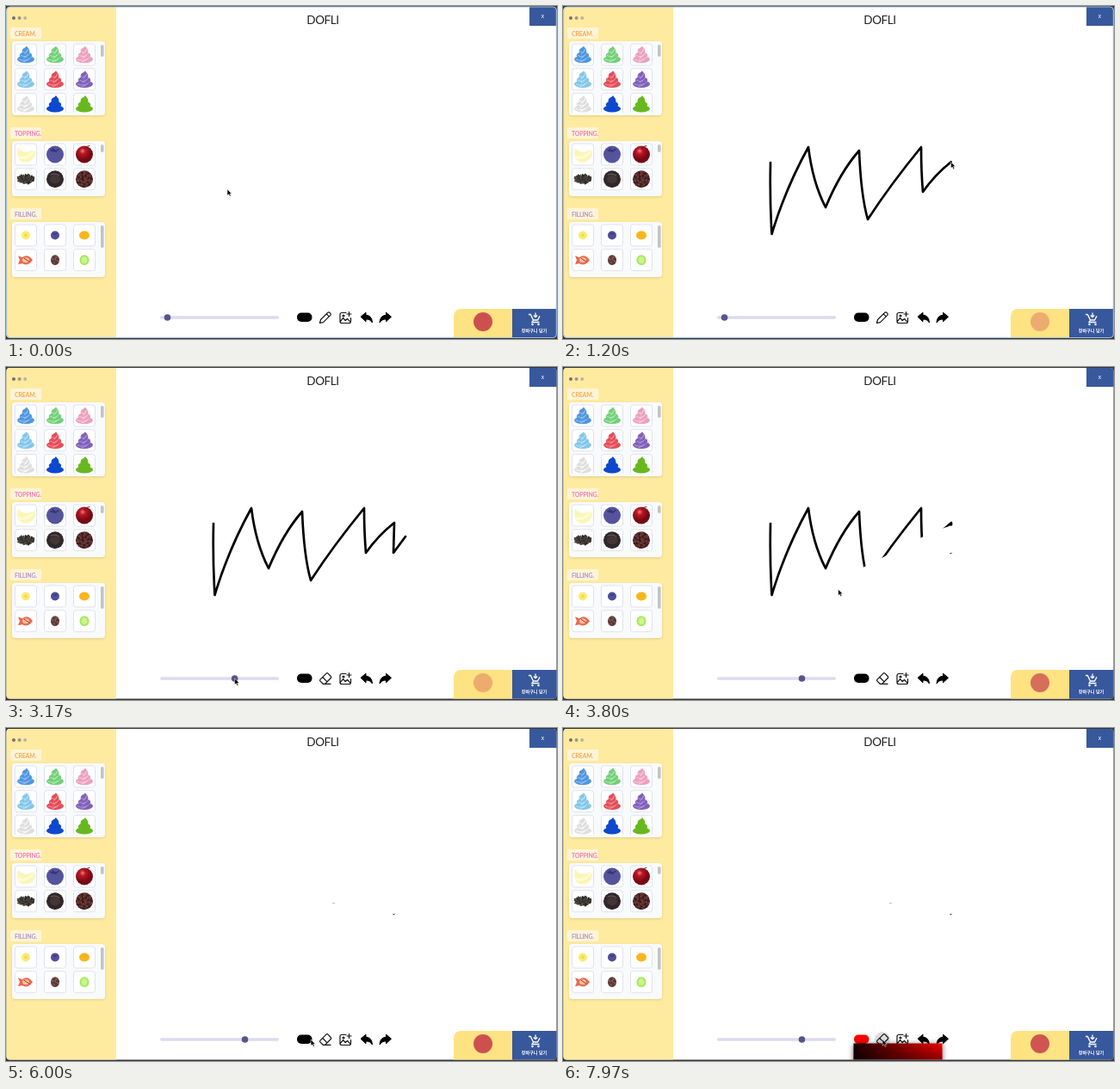
Recreate the animation shown at these times as an HTML page. Size 640x387 px, loop 8000 ms.

```html
<!DOCTYPE html>
<html lang="ko">
<head>
<meta charset="utf-8">
<style>
  html, body { margin: 0; width: 100%; height: 100%; overflow: hidden; background: #34363a; }
  svg { display: block; width: 100%; height: 100%; }
  .hand { font-family: Lato, "Open Sans", sans-serif; letter-spacing: -.03em; }
  .line { fill: none; stroke-linecap: round; stroke-linejoin: round; }
  .icon { fill: none; stroke: #111; stroke-width: 1.2; stroke-linecap: round; stroke-linejoin: round; }
  .ink { stroke: #000; stroke-width: 2.7; }
  .wipe { stroke: #fff; stroke-width: 30; }
</style>
</head>
<body>
<svg viewBox="0 0 640 387" preserveAspectRatio="none">
  <defs>
    <clipPath id="window"><rect x=".5" y="1" width="639" height="384.5" rx="4"/></clipPath>
    <linearGradient id="hue"><stop stop-color="#190000"/><stop offset="1" stop-color="#f00000"/></linearGradient>
    <linearGradient id="shade" x2="0" y2="1"><stop stop-color="#000" stop-opacity="0"/><stop offset="1" stop-color="#000" stop-opacity=".65"/></linearGradient>
    <radialGradient id="cherry" cx=".4" cy=".3"><stop stop-color="#ef7d7d"/><stop offset=".35" stop-color="#bb1623"/><stop offset="1" stop-color="#760914"/></radialGradient>
    <filter id="soft" x="-20%" y="-20%" width="140%" height="150%"><feDropShadow dx="0" dy="1" stdDeviation="1.5" flood-opacity=".13"/></filter>
    <filter id="deep" x="-20%" y="-40%" width="140%" height="180%"><feDropShadow dx="0" dy="1" stdDeviation="3" flood-opacity=".6"/></filter>
  </defs>

  <rect width="640" height="387" fill="#34363a"/>
  <g clip-path="url(#window)">
    <rect width="640" height="387" fill="#fff"/>
    <g id="strokes"></g>
    <ellipse id="crumb" cx="380.5" cy="203.8" rx="1.8" ry=".8" fill="#c4c4c4"/>

    <rect width="128" height="387" fill="#ffeb9f"/>
    <circle cx="9" cy="14" r="2" fill="#756f78"/><circle cx="15.6" cy="14" r="2" fill="#9b948f"/><circle cx="22.2" cy="14" r="2" fill="#bdb49e"/>
    <g id="panels"></g>

    <text class="hand" x="368" y="21" text-anchor="middle" font-size="13.5" fill="#242424">DOFLI</text>
    <rect x="608" width="32" height="23" fill="#38589d"/>
    <text x="623.5" y="14.3" text-anchor="middle" font-family="Inter, sans-serif" font-size="7" fill="#fff">x</text>

    <rect x="179" y="360.2" width="138" height="3.6" rx="1.8" fill="#dcdbef"/>
    <circle id="thumb" cy="362" r="3.8" fill="#56558b"/>

    <circle id="hover" cx="371" cy="362" r="9" fill="#dedede"/>
    <rect id="swatch" x="338" y="356.5" width="17.5" height="10.5" rx="5"/>
    <path id="pencil" class="icon" d="M364.5 368.5l1-4 8.2-8.2q1.2-1 2.3 0l.8.8q1 1.2 0 2.3l-8.3 8.2zM372.3 357.8l3 3"/>
    <path id="eraser" class="icon" d="M365 363.2l7-7q1-1 2 0l3.3 3.3q1 1 0 2l-6.8 6.8h-2.2l-3.3-3.2q-.9-1 0-1.9zM367.8 360.5l5.3 5.3M370.5 368.3h6.5"/>
    <path class="icon" d="M395 356.5h-5q-2 0-2 2v8q0 2 2 2h8.5q2 0 2-2v-4M388.3 366.7l3.3-4 2.6 2.8 2.3-2 3.7 3.8M398.5 355.5v5M396 358h5"/>
    <circle class="icon" cx="392" cy="360" r="1"/>
    <path id="undo" d="M412 361.2l6-5v3q7 .3 7.5 8.8-2.5-4.2-7.5-4v2.800z" stroke="#000" stroke-linejoin="round"/>
    <use href="#undo" transform="matrix(-1 0 0 1 859.5 0)"/>

    <path d="M520 387v-26q0-9 9-9h59v35z" fill="#ffe382"/>
    <circle id="badge" cx="554" cy="367" r="11" fill="#c8424b"/>
    <rect x="588" y="352" width="52" height="35" fill="#38589d"/>
    <g fill="none" stroke="#fff" stroke-width="1.3">
      <path d="M607 358.5h2.3l3.2 6.5h5l2.5-4.7M612.5 365l-1.5 2.5h8.5M615 356.5v5M612.8 359.5l2.2 2.2 2.2-2.2"/>
      <circle cx="611.5" cy="370" r=".6"/><circle cx="618.5" cy="370" r=".6"/>
    </g>
    <text x="613.5" y="378.7" text-anchor="middle" font-family="'Noto Sans CJK KR', 'Noto Sans CJK', sans-serif" font-size="5.1" font-weight="700" fill="#fff">장바구니 담기</text>

    <g id="picker" filter="url(#deep)">
      <rect x="337.5" y="366.5" width="103" height="30" fill="url(#hue)"/>
      <rect x="337.5" y="366.5" width="103" height="30" fill="url(#shade)"/>
    </g>
    <path id="cursor" d="M0 0v7.2l1.7-1.5 1.2 2.6 1.3-.6-1.2-2.5h2.3z" stroke="#fff" stroke-width=".5"/>
  </g>
  <rect id="frame" x=".7" y="1" width="638.6" height="384.5" rx="4" fill="none" stroke="#9dbfde"/>
</svg>

<script>
const $ = id => document.getElementById(id);
const LOOP = 8000;

// Sidebar artwork; every item is drawn around its cell centre.
const disc = (r, fill, ry = r) => `<ellipse rx="${r}" ry="${ry}" fill="${fill}"/>`;
const arc = (d, color, width = 1) => `<path d="${d}" class="line" stroke="${color}" stroke-width="${width}"/>`;

// Three shrinking tiers under a small tip.
function cream(fill, swirl) {
  let art = `<path d="M-4-4Q-2-7 1-10 4-7 4-4Z" fill="${fill}"/>`;
  for (let tier = 0; tier < 3; tier++) {
    const r = 10 - tier * 2.8, y = 5.5 - tier * 4.6;
    art += `<ellipse cy="${y}" rx="${r}" ry="4.2" fill="${fill}"/>`;
    if (swirl) art += arc(`M${-r * .8} ${y}q${r * .8} 4 ${r * 1.5}-3M${-r * .3} ${y + 3}q${r * .5}-1 ${r * .7}-4`, swirl, .9);
  }
  return art;
}

// Sunflower spread of small grains.
function grains(count, spreadX, spreadY, colors, size) {
  let art = "";
  for (let i = 0; i < count; i++) {
    const r = Math.sqrt((i + .5) / count), a = i * 2.4;
    art += `<ellipse transform="translate(${r * spreadX * Math.cos(a)} ${r * spreadY * Math.sin(a)}) rotate(${i * 67})" rx="${size}" ry="${size * .6}" fill="${colors[i % colors.length]}"/>`;
  }
  return art;
}

const panels = [
  { y: 41, height: 86, label: "CREAM.", color: "#f7a950", bar: 14, items: [
    cream("#4f96dd", "#9bcaf5"), cream("#72cf79", "#b9efb8"), cream("#eba0bd", "#fbd5e0"),
    cream("#83c6ea", "#c6e8f8"), cream("#e34d59", "#f79a9d"), cream("#8160bb", "#b79ddb"),
    cream("#dedede", "#fff"), cream("#0d48cf"), cream("#67b81e")] },
  { y: 157, height: 64, label: "TOPPING.", color: "#f07fb5", bar: 9, items: [
    `<path d="M-9-8Q-3 0 6-4 11-6 11 0 8 10-2 9-12 8-9-8Z" fill="#fbf6b4"/>` + arc("M-8 3Q0 6 8-2", "#fffbd8", 3),
    disc(10, "#55539d") + arc("M-5-5Q0-2 4-6M-3-7L1-3", "#35346e", 1.5),
    disc(10, "url(#cherry)") + arc("M0-6Q2-10 6-10", "#5d2a1d"),
    grains(48, 9.5, 5, ["#2c2926", "#544b42", "#3d3732"], 2),
    disc(10, "#30272a") + disc(6, "#433637", 5) + arc("M-5-5Q0-8 5-4", "#75645f"),
    disc(10, "#4b2526") + grains(45, 9, 9, ["#78433d", "#341719", "#623330"], 1.4)] },
  { y: 251, height: 64, label: "FILLING.", color: "#b394cf", bar: 26, items: [
    disc(5, "#f8ec73") + disc(2, "#f5d84e"),
    disc(5, "#504e98") + arc("M-2-2Q0 0 2-2", "#302e69"),
    disc(6, "#fab51b", 5),
    `<path d="M-9-5L-4-3Q2-8 8 0 2 8-4 4L-9 5-7 0Z" fill="#e9694e"/>` + disc(4, "#f8c4a4", 3) + arc("M-2-2L4 2", "#b52e27"),
    disc(5, "#67423d", 6) + grains(14, 4, 4, ["#8d665c", "#472b29"], 1),
    disc(5.5, "#a6e75c", 6) + disc(3.5, "#c8f58d", 4)] }
];

$("panels").innerHTML = panels.map(({ y, height, label, color, bar, items }, p) => `
  <rect x="5" y="${y - 16}" width="36" height="13" rx="1" fill="#fff4d8"/>
  <text class="hand" x="10" y="${y - 6.5}" font-size="7" font-weight="700" fill="${color}">${label}</text>
  <rect x="7" y="${y}" width="108" height="${height}" rx="4" fill="#f9fafc" filter="url(#soft)"/>
  <clipPath id="clip${p}"><rect x="7" y="${y}" width="108" height="${height - 3}"/></clipPath>
  <g clip-path="url(#clip${p})">${items.map((art, i) => `
    <g transform="translate(${23 + i % 3 * 34} ${y + 15.5 + Math.floor(i / 3) * 28.7})">
      <rect x="-12.5" y="-12.5" width="25" height="25" rx="3" fill="#fff" stroke="#d7dce6" stroke-width=".8"/>${art}
    </g>`).join("")}</g>
  <rect x="110" y="${y + 4}" width="3.6" height="${bar}" rx="1.8" fill="#c2c3c7"/>`).join("");

// What the pointer does; it glides from the end of one gesture to the start of the next.
const gesture = (start, end, d, kind = "move") => {
  const path = document.createElementNS("http://www.w3.org/2000/svg", "path");
  path.setAttribute("d", d);
  path.setAttribute("class", `line ${kind}`);
  $("strokes").append(path);
  return { start, end, path, length: path.getTotalLength() };
};
const rest = (start, end, x, y) => gesture(start, end, `M${x} ${y}h.1`);

const slide = gesture(2980, 3200, "M187.5 362H277.5");
const gestures = [
  rest(0, 20, 257, 213),
  gesture(150, 1300, "M241 182Q240 225 242.5 265 258 213 285 164 290 205 305 234 322 193 344 168 346 220 354 248 380 208 416 164 416 192 418 216 432 196 451 181L450 216 464 197", "ink"),
  gesture(2000, 2400, "M371 362L362 370"),
  slide,
  gesture(3350, 3800, "M466 196L448 201 428 209 352 248 320 259", "wipe"),
  gesture(3800, 4610, "M320 259L300 222 238 220V185L278 195 285 168 304 215 345 165 348 225 375 215 416 165V200L448 183", "wipe"),
  rest(4800, 4950, 179, 302),
  gesture(5100, 5280, "M252 234L240 268", "wipe"),
  rest(5700, 6300, 354, 362),
  gesture(6650, 7500, "M385 392H425"),
  rest(7850, LOOP, 371, 362)
];

const clamp = (v, low = 0, high = 1) => Math.min(high, Math.max(low, v));
const smooth = k => k * k * (3 - 2 * k);
const fade = (t, start, end) => clamp(Math.min(t - start, end - t) / 100);
const show = (id, visible) => $(id).style.display = visible ? "" : "none";

const progress = ({ start, end }, t) => clamp((t - start) / (end - start));
const along = ({ path, length }, k) => path.getPointAtLength(length * k);

function pointerAt(t) {
  const i = gestures.findLastIndex(g => g.start <= t);
  const now = gestures[i], next = gestures[i + 1];
  if (t <= now.end || !next) return along(now, progress(now, t));
  const from = along(now, 1), to = along(next, 0);
  const k = smooth((t - now.end) / (next.start - now.end));
  return { x: from.x + (to.x - from.x) * k, y: from.y + (to.y - from.y) * k };
}

function render(t) {
  for (const g of gestures) {
    g.path.style.display = t > g.start ? "" : "none";
    g.path.style.strokeDasharray = `${g.length * progress(g, t)} ${g.length + 1}`;
  }
  const { x, y } = pointerAt(t);
  $("cursor").setAttribute("transform", `translate(${x} ${y})`);
  $("thumb").setAttribute("cx", along(slide, progress(slide, t)).x);
  $("hover").style.opacity = Math.max(fade(t, 1930, 2640), fade(t, 7750, 8200));
  $("badge").style.opacity = .67 - .33 * Math.cos((t - 1250) / 1000 * Math.PI);
  $("swatch").setAttribute("fill", t < 7000 ? "#000" : "#f00");
  show("pencil", t < 2250);
  show("eraser", t >= 2250);
  show("crumb", t >= 4520);
  show("picker", t >= 6250);
  show("frame", t < 2800);
}

function tick() {
  render(performance.now() % LOOP);
  requestAnimationFrame(tick);
}
tick();
</script>
</body>
</html>
```
